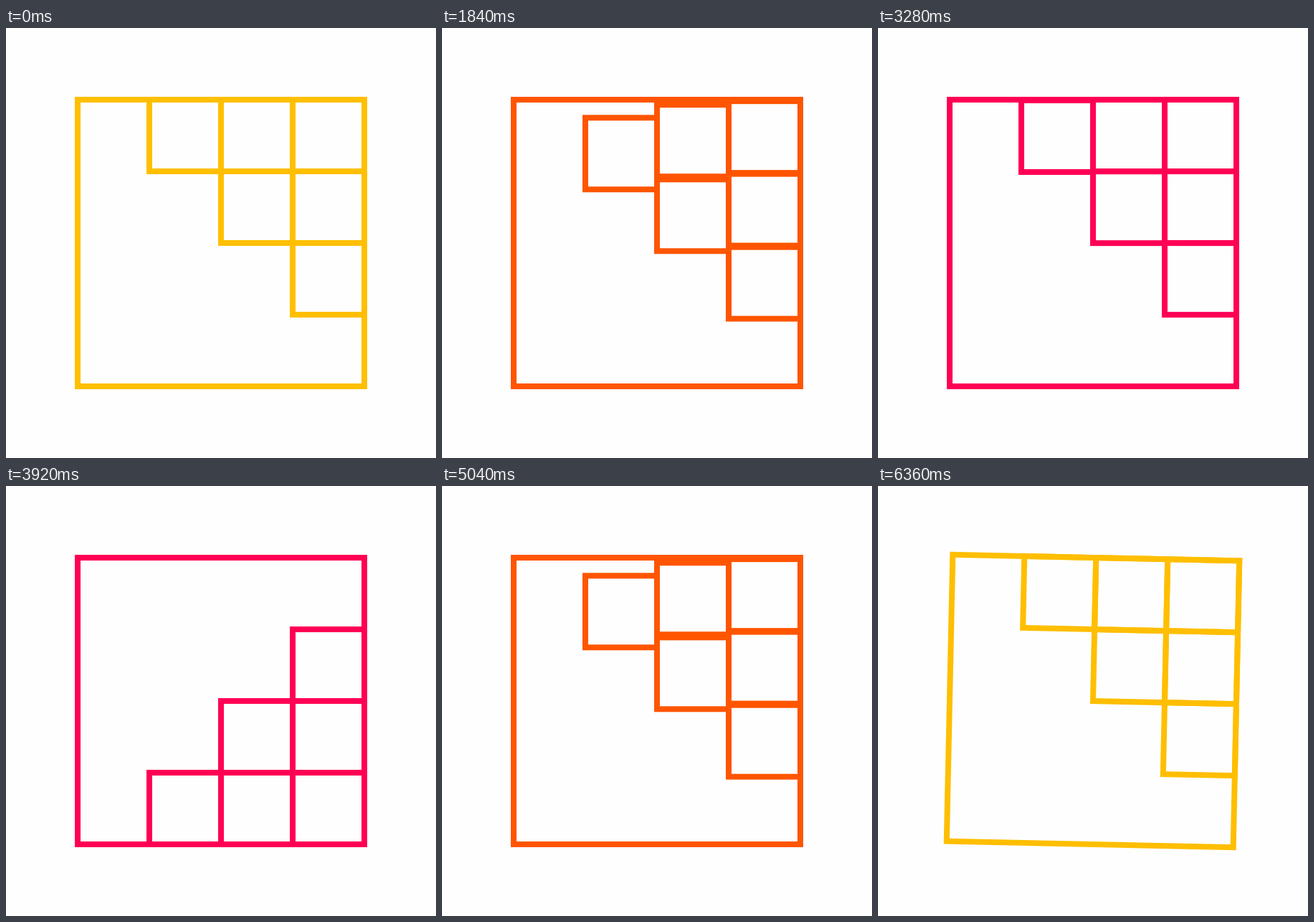
Recreate the animation shown at these times as an HTML page. Size 600 by 600 pixels, loop 6400 ms.

```html
<!DOCTYPE html>
<html lang="en">
<head>
<meta charset="utf-8">
<title>Tumbling squares</title>
<style>
  html, body {
    margin: 0;
    width: 100%;
    height: 100%;
    overflow: hidden;
    background: #fefefe;
  }
  svg {
    display: block;
    width: 100vw;
    height: 100vh;
  }

  /* One turn lasts 1600 ms; the colours need four turns. */
  .box {
    fill: none;
    stroke-width: 8;
    transform-origin: 300px 300px;
    animation: spin 1600ms infinite, tint 6400ms infinite;
    animation-timing-function: cubic-bezier(.815, 0, .6, 1);
  }
  /* Cubic ease-in */
  .tile {
    animation: 1600ms cubic-bezier(.3333, 0, .6667, 0) infinite;
  }
  .first  { animation-name: fall-first; }
  .second { animation-name: fall-second; }
  .third  { animation-name: fall-third; }
  .last   { animation-name: fall-last; }

  .far  { --drop: 300px; }
  .mid  { --drop: 200px; }
  .near { --drop: 100px; }

  @keyframes spin {
    0%, 67.25% { transform: rotate(0deg); }
    100% { transform: rotate(-90deg); }
  }
  @keyframes tint {
    0%, 16.8125% { stroke: #ffbf00; }
    25%, 41.8125% { stroke: #ff5500; }
    50%, 66.8125% { stroke: #ff0055; }
    75%, 91.8125% { stroke: #ff5500; }
    100% { stroke: #ffbf00; }
  }

  /* Each fall takes 550 ms and starts 30 ms after the one before. */
  @keyframes fall-first {
    0% { transform: translateY(0); }
    34.375%, 100% { transform: translateY(var(--drop)); }
  }
  @keyframes fall-second {
    0%, 1.875% { transform: translateY(0); }
    36.25%, 100% { transform: translateY(var(--drop)); }
  }
  @keyframes fall-third {
    0%, 3.75% { transform: translateY(0); }
    38.125%, 100% { transform: translateY(var(--drop)); }
  }
  @keyframes fall-last {
    0%, 5.625% { transform: translateY(0); }
    40%, 100% { transform: translateY(var(--drop)); }
  }
</style>
</head>
<body>
<svg viewBox="0 0 600 600">
  <g class="box">
    <rect x="100" y="100" width="400" height="400"/>
    <g class="far">
      <rect class="tile first" x="200" y="100" width="100" height="100"/>
    </g>
    <g class="mid">
      <rect class="tile third" x="300" y="100" width="100" height="100"/>
      <rect class="tile second" x="300" y="200" width="100" height="100"/>
    </g>
    <g class="near">
      <rect class="tile last" x="400" y="100" width="100" height="100"/>
      <rect class="tile third" x="400" y="200" width="100" height="100"/>
      <rect class="tile second" x="400" y="300" width="100" height="100"/>
    </g>
  </g>
</svg>
</body>
</html>
```
